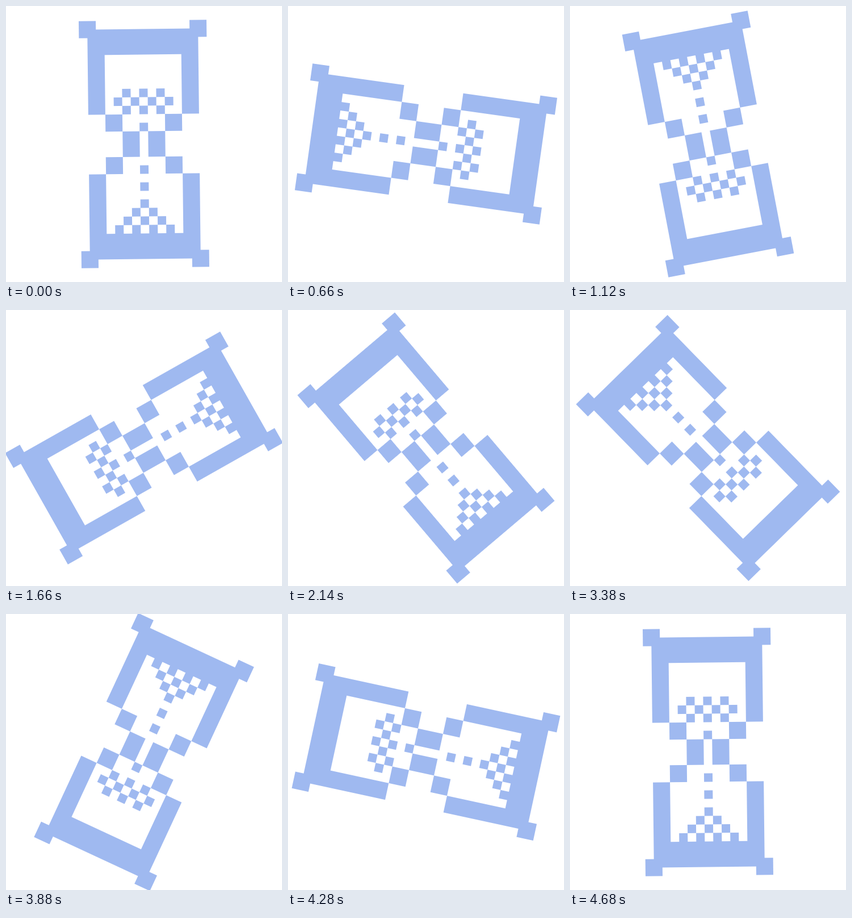
An HTML page that plays this animation: 486x486 px, repeating every 4820 ms.

```html
<!DOCTYPE html>
<html lang="en">
<head>
<meta charset="utf-8">
<title>Hourglass</title>
<style>
  html, body { margin: 0; width: 100%; height: 100%; overflow: hidden; background: #fff; }
  svg { display: block; width: 100%; height: 100%; }

  .glass {
    fill: #9fb9f0;
    transform-origin: 0 0;
    animation: turn 4820ms linear infinite;
  }
  .sand { fill: none; stroke: #9fb9f0; stroke-width: 1; stroke-dasharray: 1 1; }

  /* four half turns with a short rest after each */
  @keyframes turn {
    0%, .415%         { transform: rotate(0deg); }
    13.693%           { transform: rotate(98.5deg); }
    23.237%           { transform: rotate(169.7deg); }
    24.689%, 26.763%  { transform: rotate(180deg); }
    44.398%           { transform: rotate(320.2deg); }
    49.793%, 52.075%  { transform: rotate(360deg); }
    60.996%           { transform: rotate(427.4deg); }
    75.934%, 78.112%  { transform: rotate(540deg); }
    80.498%           { transform: rotate(565.4deg); }
    97.095%, 100%     { transform: rotate(720deg); }
  }
</style>
</head>
<body>
<svg viewBox="0 0 486 486">
  <g transform="translate(243 243)">
    <g class="glass">
      <!-- 15 by 29 cells of 15 px -->
      <g transform="rotate(-.66) scale(15) translate(-7.5 -14.5)">
        <path d="M0 0h2v2h-2z M13 0h2v2h-2z M0 27h2v2h-2z M13 27h2v2h-2z
                 M2 1H13V2H14V11H12V4H3V11H1V2H2z
                 M1 18H3V25H12V18H14V27H13V28H2V27H1z
                 M3 11h2v2h-2z M10 11h2v2h-2z M3 16h2v2h-2z M10 16h2v2h-2z
                 M5 13h2v3h-2z M8 13h2v3h-2z"/>
        <path class="sand" d="M5 8.5h5 M4 9.5h7 M5 10.5h5 M7 12.5h1
                              M7.5 17v3
                              M7 21.5h1 M6 22.5h3 M5 23.5h5 M4 24.5h7"/>
      </g>
    </g>
  </g>
</svg>
</body>
</html>
```
